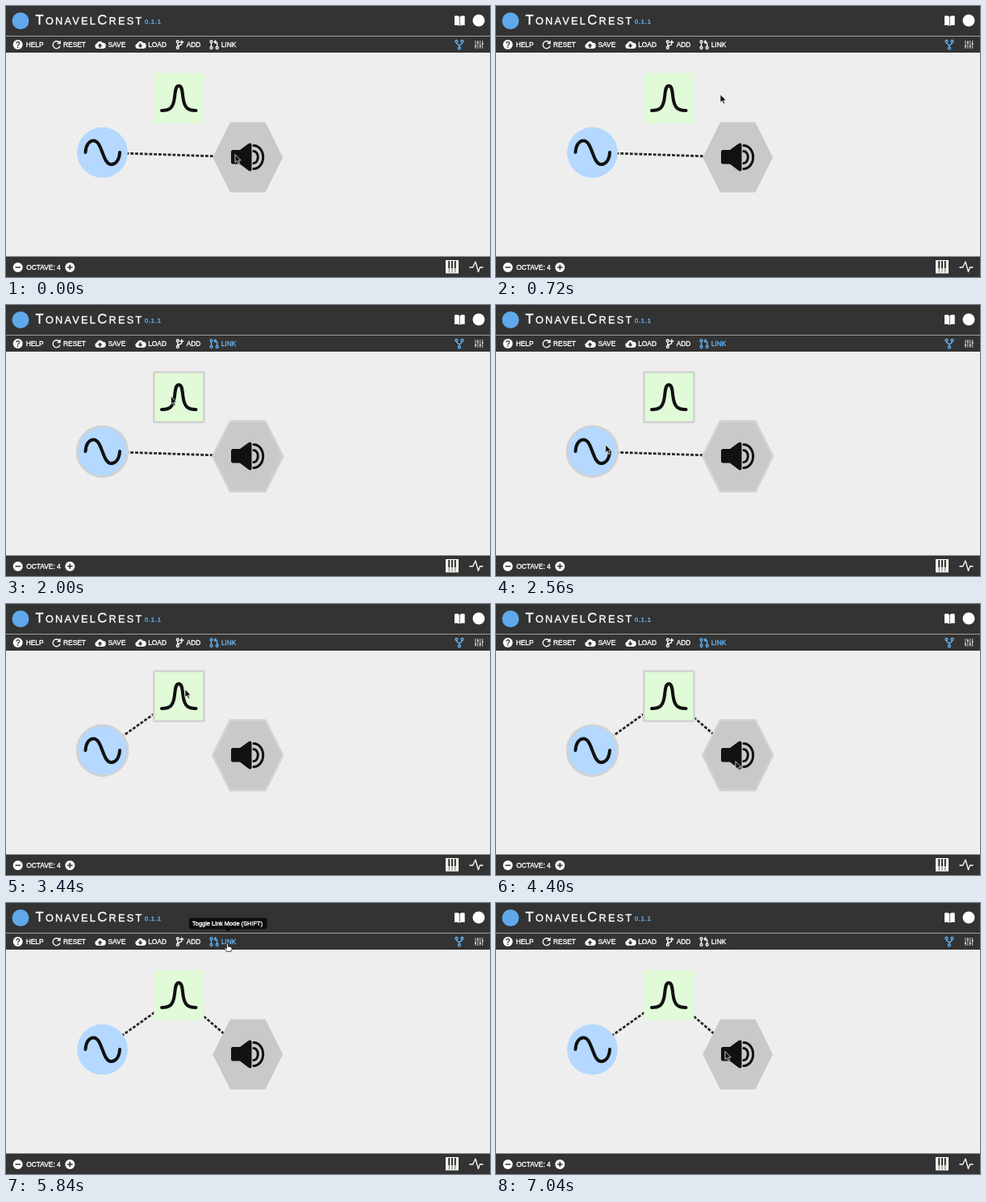
An HTML page for the animation above (7.12 s loop, 600 px wide and 337 px high).

```html
<!DOCTYPE html>
<html lang="en">
<head>
<meta charset="utf-8">
<title>TonavelCrest</title>
<style>
  html, body { margin: 0; width: 100%; height: 100%; overflow: hidden; background: #eee; }
  svg { display: block; width: 100vw; height: 100vh; }
  text { font-family: "Liberation Sans", Arial, sans-serif; fill: #fff; stroke: #fff; stroke-width: .35; }
  .label { font-size: 8.4px; }
  .line { fill: none; stroke: #fff; stroke-width: 1.3; }
  .white { fill: #fff; }
  .ink { fill: none; stroke: #111; stroke-width: 4; stroke-linecap: round; stroke-linejoin: round; }
  .wire { stroke: #262626; stroke-width: 2.8; stroke-dasharray: 3.8 2; }
  .node { stroke: none; }
  .linking .node { stroke: #d2d2d2; stroke-width: 2.6; stroke-linejoin: round; }
  .blue text { fill: #63b3f5; stroke: #63b3f5; }
  .blue .line { stroke: #63b3f5; }
</style>
</head>
<body>
<svg viewBox="0 0 600 337" preserveAspectRatio="none">
  <rect width="600" height="337" fill="#eee"/>

  <g id="graph">
    <line class="wire" id="direct" x1="119.5" y1="182.2" x2="300" y2="188.2"/>
    <line class="wire" id="first" x1="119.5" y1="182.2"/>
    <line class="wire" id="second" x1="214.5" y1="114.5"/>
    <circle class="node" cx="119.5" cy="182.2" r="31.4" fill="#b4d8ff"/>
    <path class="ink" d="M98.5 182C99 173 103 167.5 108.5 167.5C119.5 167.5 119.5 197 130.5 197C136 197 140.5 191.5 141 182"/>
    <rect class="node" x="183.3" y="83.5" width="62.2" height="62.2" rx="1" fill="#e1fad8"/>
    <path class="ink" d="M193 130C202.5 130 207.300 127.500 209 113.500C210 103.500 210.700 99.300 214.200 99.300C217.700 99.300 218.400 103.500 219.400 113.500C221.100 127.500 226 130 235.500 130"/>
    <path class="node" d="M256.3 188.2L278 144.6H321.5L343.2 188.2L321.5 231.8H278Z" fill="#c9c9c9"/>
    <path d="M281.5 179H290L300.5 171.3Q304.5 169 304.5 173V203Q304.5 207 300.5 204.5L290 196.5H281.5Q279 196.5 279 194V181.5Q279 179 281.5 179Z" fill="#111"/>
    <path class="ink" style="stroke-width:3" d="M307 180.5A5.3 7.5 0 0 1 307 195.5M307 173.5A11.7 14.5 0 0 1 307 202.5"/>
  </g>

  <!-- bars -->
  <rect width="600" height="58" fill="#333"/>
  <rect y="37" width="600" height="1" fill="#a0a0a0"/>
  <rect y="311.5" width="600" height="25.5" fill="#333"/>

  <!-- header -->
  <circle cx="18" cy="18.5" r="10.5" fill="#5fa8ea"/>
  <text x="36.5" y="23" font-size="16.5" letter-spacing="2.3">T<tspan font-size="12.7">ONAVEL</tspan>C<tspan font-size="12.7">REST</tspan></text>
  <text x="172" y="22.3" font-size="7.5" letter-spacing=".8" style="fill:#63b3f5;stroke:#63b3f5">0.1.1</text>
  <path class="white" d="M556 12.5Q559.5 11.3 562 13.2V24.8Q559.5 23 556 24ZM568.7 12.5Q565.2 11.3 562.7 13.2V24.8Q565.2 23 568.7 24Z"/>
  <circle class="white" cx="586" cy="18" r="7.5"/>

  <!-- toolbar -->
  <circle class="white" cx="14.7" cy="48" r="6"/>
  <text x="14.7" y="51.6" font-size="10" font-weight="bold" text-anchor="middle" style="fill:#333;stroke:none">?</text>
  <path class="line" d="M66.3 45.6A4.5 4.5 0 1 0 67 49.5"/>
  <path class="white" d="M67.7 42.5V47.2H63Z"/>
  <path class="white" id="cloud" d="M113 53A3.2 3.2 0 0 1 112.5 46.8A4 4 0 0 1 119.8 45.8A3.6 3.6 0 0 1 120.5 53Z"/>
  <use href="#cloud" x="50"/>
  <path d="M116.5 46.5L119.5 49.7H117.5V52H115.5V49.7H113.5Z" fill="#333"/>
  <path d="M166.5 52L169.5 48.8H167.5V46.5H165.5V48.8H163.5Z" fill="#333"/>
  <g class="line">
    <circle cx="212.8" cy="44.5" r="1.5"/><circle cx="212.8" cy="52" r="1.5"/>
    <path d="M212.8 46V50.5M212.8 49.5Q217.8 49 217.8 46.5M217.8 42.5V47.5M215.3 45H220.3"/>
  </g>
  <g class="label">
    <text x="24.7" y="51.2">HELP</text>
    <text x="71" y="51.2">RESET</text>
    <text x="126.5" y="51.2">SAVE</text>
    <text x="176.2" y="51.2">LOAD</text>
    <text x="223.7" y="51.2">ADD</text>
    <text x="25.2" y="328.2">OCTAVE: 4</text>
  </g>
  <g id="link">
    <g class="line">
      <circle cx="254.5" cy="44.5" r="1.5"/><circle cx="254.5" cy="52" r="1.5"/><circle cx="261.7" cy="52" r="1.5"/>
      <path d="M254.5 46V50.5M261.7 50.5V46.5Q261.7 44.7 259 44.7M260.3 42.5L258.2 44.7L260.3 46.9"/>
    </g>
    <text class="label" x="266.7" y="51.2">LINK</text>
  </g>
  <g class="blue"><g class="line">
    <circle cx="558.5" cy="44" r="1.5"/><circle cx="565.5" cy="44" r="1.5"/><circle cx="562" cy="52.5" r="1.5"/>
    <path d="M558.5 45.5Q558.5 47 562 48.8Q565.5 47 565.5 45.5M562 48.5V51"/>
  </g></g>
  <path d="M582 43V53M584.9 43V53M587.8 43V53M590.7 43V53" stroke="#ddd" stroke-width=".9"/>
  <path d="M581.2 50H582.8M584.1 45.5H585.7M587 50H588.6M589.9 47H591.5" stroke="#fff" stroke-width="1.3"/>

  <!-- footer -->
  <circle class="white" cx="14.7" cy="325" r="6"/>
  <circle class="white" cx="79.3" cy="325" r="6"/>
  <path d="M11.5 325H18M76 325H82.6M79.3 321.7V328.3" stroke="#333" stroke-width="1.7"/>
  <rect x="545.5" y="316.5" width="15" height="15.5" fill="#f0f8ea" stroke="#fff"/>
  <path d="M549.3 317V331.5M553 317V331.5M556.8 317V331.5" stroke="#555" stroke-width=".8"/>
  <path d="M549.3 317V326M553 317V326M556.8 317V326" stroke="#333" stroke-width="2"/>
  <path class="line" stroke-linejoin="round" d="M574.5 325H578.7L582 318L585.5 330.5L587.5 325H591.5"/>

  <g id="tip">
    <rect x="227" y="18.5" width="96.5" height="14" rx="2.5" fill="#0c0c0c"/>
    <path d="M271.3 32H279L275.2 36Z" fill="#0c0c0c"/>
    <text x="231" y="27.7" font-size="7.47">Toggle Link Mode (SHIFT)</text>
  </g>

  <path id="arrow" d="M0 0V10L2.3 8L4 11.8L5.7 11L4.1 7.4H7.2Z" fill="#111" stroke="#eee" stroke-width=".8"/>
  <path id="hand" d="M-1 1Q0 -.5 1 1V4Q2 3.3 2.7 4.3Q3.6 3.7 4.2 4.8Q5.500 4.400 5.500 6V7.500L4.400 10H-1L-3.700 6.300Q-3.200 4.900-2 5.700L-1 6.700Z" fill="#fff" stroke="#111" stroke-width=".8"/>
</svg>
<script>
const LOOP = 7120, STEP = 80;
const MODE_ON = 1360, MODE_OFF = 5440;
const DRAG_1 = [2640, 3360], DRAG_2 = [3520, 4320];
const FILTER = [214.5, 114.5], OUTPUT = [300, 188.2];

// time, x, y of the pointer tip
const path = [
  [0, 284, 184.5], [240, 284, 184.5], [1120, 273.5, 53.3], [1280, 273.5, 53.3],
  [1520, 273.5, 53.3], [2480, 135.5, 173.5], [2640, 136, 174],
  [3360, 222, 106], [3520, 222, 106], [4320, 297, 195.5],
  [4560, 297, 195.5], [5440, 274.5, 50.3], [5840, 274.5, 50.3],
  [6880, 284, 184.5], [LOOP, 284, 184.5]
];

const $ = id => document.getElementById(id);
const ease = u => u * u * (3 - 2 * u);
const show = (id, on) => $(id).style.display = on ? "" : "none";

function pointerAt(t) {
  const i = path.findIndex(p => p[0] > t);
  const [a, b] = [path[i - 1], path[i]];
  const u = ease((t - a[0]) / (b[0] - a[0]));
  return [a[1] + (b[1] - a[1]) * u, a[2] + (b[2] - a[2]) * u];
}

// follows the pointer while dragged, then snaps to its node
function drawWire(id, t, [start, end], pos, goal) {
  const [x, y] = t < end ? pos : goal;
  $(id).setAttribute("x2", x);
  $(id).setAttribute("y2", y);
  show(id, t >= start);
}

function draw(t) {
  const pos = pointerAt(t), [x, y] = pos;
  const hover = x > 248 && x < 292 && y > 38 && y < 58;
  const linking = t >= MODE_ON && t < MODE_OFF;
  $("graph").classList.toggle("linking", linking);
  $("link").classList.toggle("blue", linking || hover);
  show("tip", hover);
  show("hand", hover);
  show("arrow", !hover);
  $(hover ? "hand" : "arrow").setAttribute("transform", `translate(${x} ${y})`);
  show("direct", t < DRAG_1[1]);
  drawWire("first", t, DRAG_1, pos, FILTER);
  drawWire("second", t, DRAG_2, pos, OUTPUT);
}

const begin = performance.now();
function tick() {
  const t = (performance.now() - begin) % LOOP;
  draw(Math.floor(t / STEP) * STEP);
  requestAnimationFrame(tick);
}
draw(0);
requestAnimationFrame(tick);
</script>
</body>
</html>
```
